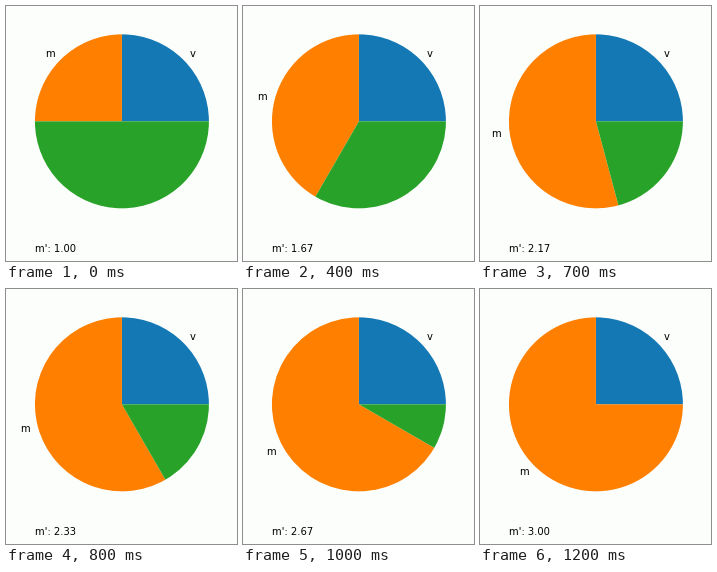
Write a matplotlib script that moves like this. It is 231x255 px and loops after 1300 ms.

```python
import matplotlib.pyplot as plt
from matplotlib.animation import FuncAnimation

W, H, DPI = 231, 255, 72
FRAMES, INTERVAL = 13, 100
SIDE = 217.44            # axes side in pixels
CX, CY = 115.92, 139.66  # pie centre, from the bottom left
COLORS = ["#1478b4", "#ff8000", "#28a228"]

plt.rcParams.update({"font.family": "DejaVu Sans", "font.size": 10,
                     "savefig.dpi": DPI})

fig = plt.figure(figsize=(W / DPI, H / DPI), dpi=DPI, facecolor="#fcfefc")
ax = fig.add_axes([(CX - SIDE / 2) / W, (CY - SIDE / 2) / H,
                   SIDE / W, SIDE / H])


def draw(i):
    m = 1 + 2 * i / (FRAMES - 1)
    ax.clear()
    ax.pie([1, m, 3 - m], labels=["v", "m", ""], colors=COLORS)
    ax.text(-1, -1.5, f"m': {m:.2f}")
    return ax.patches + ax.texts


anim = FuncAnimation(fig, draw, frames=FRAMES, interval=INTERVAL,
                     init_func=lambda: [], repeat=True, repeat_delay=0)
plt.show()
```
